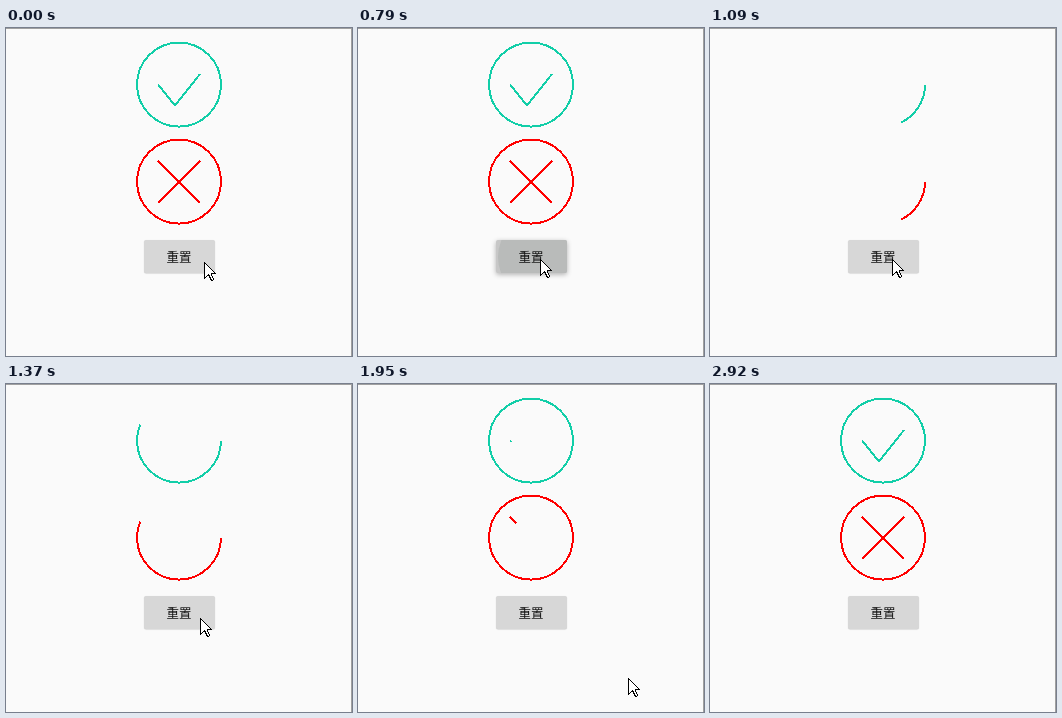
Write an HTML page that moves like this. It is 346 by 328 pixels and loops after 3.45 s.

```html
<!DOCTYPE html>
<html lang="zh">
<head>
<meta charset="utf-8">
<style>
  html, body { margin: 0; width: 100%; height: 100%; overflow: hidden; background: #fafafa; }
  #stage { position: relative; width: 346px; height: 328px; overflow: hidden; }
  #stage::after {
    content: ""; position: absolute; inset: 0;
    border: solid #a0a0a0; border-width: 1px 1px 0 0;
  }
  svg {
    position: absolute; left: 0; top: 0; fill: none;
    stroke-width: 2; stroke-linejoin: bevel; shape-rendering: crispEdges;
  }
  #button {
    position: absolute; left: 137.5px; top: 211.5px; width: 71px; height: 33px;
    border-radius: 2px; overflow: hidden; background: #d6d7d7;
    color: #111; text-align: center;
    font: 12.5px/33px "Noto Sans CJK SC", "Noto Sans CJK", sans-serif;
  }
  #ripple {
    position: absolute; left: 2px; top: -27px; width: 88px; height: 88px;
    border-radius: 50%; background: #b9bbba;
  }
  #button span { position: relative; }
</style>
</head>
<body>
<div id="stage">
  <div id="button"><div id="ripple"></div><span>重置</span></div>
  <svg width="346" height="328">
    <g stroke="#12cea8">
      <circle class="ring" cx="173" cy="56.6" r="42" pathLength="1"/>
      <path id="check" pathLength="1" d="M152 56.5L169 77.5L194 46"/>
    </g>
    <g stroke="#f00">
      <circle class="ring" cx="173" cy="153.6" r="42" pathLength="1"/>
      <path class="cross" pathLength="1" d="M152 133L194 175"/>
      <path class="cross" pathLength="1" d="M194 133L152 175"/>
    </g>
    <path id="cursor" fill="#fff" stroke="#000" stroke-width="1"
      d="M.5 .5V16.5L4.5 12.5L7.5 18.5H8.5L9.5 17.5L7 11.5H11.5Z"/>
  </svg>
</div>
<script>
const LOOP = 3450, TICK = 142, OFFSET = 80;
const PRESS = 790, RESET = 930, CURSOR_GONE = 2200;

// Cursor waypoints: time, x, y
const route = [
  [80, 198, 234], [506, 182, 231], [1216, 182, 231], [1358, 194, 234],
  [1642, 254, 283], [1926, 270, 294], [2068, 282, 304],
];

const byId = id => document.getElementById(id);
const all = name => document.querySelectorAll("." + name);
const rings = all("ring"), cross = all("cross"), check = byId("check");
const cursor = byId("cursor"), ripple = byId("ripple"), button = byId("button");

const clamp = v => Math.min(1, Math.max(0, v));
const ease = v => (1 - Math.cos(Math.PI * clamp(v))) / 2;

function reveal(shape, part) {
  shape.style.visibility = part > 0 ? "visible" : "hidden";
  shape.setAttribute("stroke-dasharray", part > 0.999 ? "none" : `${part} 2`);
}

function cursorAt(time) {
  const next = Math.max(1, route.findIndex(p => p[0] > time));
  if (time >= route.at(-1)[0]) return route.at(-1).slice(1);
  const [t0, x0, y0] = route[next - 1], [t1, x1, y1] = route[next];
  const k = clamp((time - t0) / (t1 - t0));
  return [x0 + (x1 - x0) * k, y0 + (y1 - y0) * k].map(Math.round);
}

function draw(time) {
  const progress = (begin, duration) => time < RESET ? 1 : ease((time - begin) / duration);
  rings.forEach(ring => reveal(ring, progress(770, 1090)));
  reveal(check, progress(1820, 1000));
  cross.forEach((stroke, i) => reveal(stroke, progress(1785 + 550 * i, 550)));

  cursor.setAttribute("transform", `translate(${cursorAt(time)})`);
  cursor.style.visibility = time < CURSOR_GONE ? "visible" : "hidden";

  const press = time < PRESS ? 0 : clamp(1 - (time - PRESS) / 270);
  const tone = Math.round(215 - 16 * press);
  ripple.style.opacity = press;
  button.style.backgroundColor = `rgb(${tone},${tone},${tone})`;
  button.style.boxShadow =
    `0 ${0.5 + press}px ${1 + 4 * press}px rgba(0,0,0,${0.2 + 0.1 * press})`;
}

// The picture advances in ticks, like a screen recording.
const start = performance.now();
function tick() {
  const time = (performance.now() - start) % LOOP;
  draw(Math.floor((time - OFFSET) / TICK) * TICK + OFFSET);
  requestAnimationFrame(tick);
}
tick();
</script>
</body>
</html>
```
